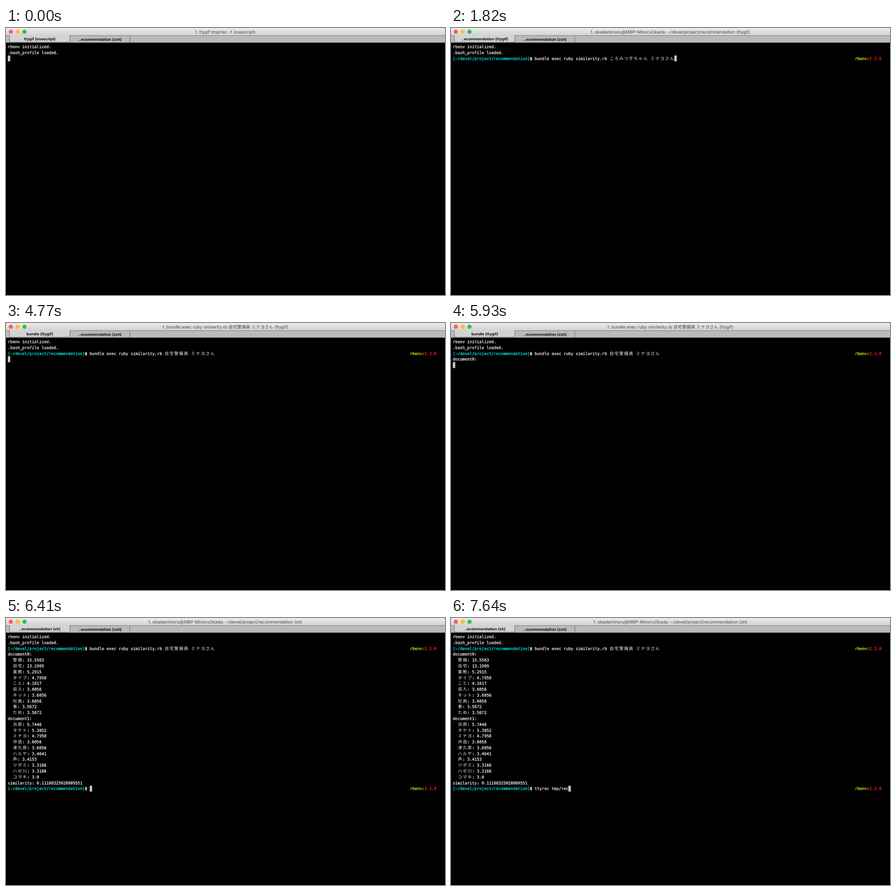
An HTML page with a canvas that plays this animation: 959x584 px, repeating every 7.99 s.

```html
<!DOCTYPE html>
<html lang="ja">
<head>
<meta charset="utf-8">
<title>Terminal</title>
<style>
html, body { margin: 0; width: 100%; height: 100%; overflow: hidden; background: #000; }
canvas { display: block; }
</style>
</head>
<body>
<canvas id="stage" width="959" height="584"></canvas>
<script>
const ctx = document.getElementById('stage').getContext('2d');
const LOOP = 7990, CELL = 5.26, ROW = 12.78, LEFT = 4, TOP = 34.6;
const SANS = 'Inter, "Noto Sans CJK JP", sans-serif';
const MONO = '8.8px "DejaVu Sans Mono", "Noto Sans CJK JP", monospace';
const WIDE = '9.2px "Noto Sans CJK JP", sans-serif';
const FG = '#f0f0f0', CYAN = '#00eeee', YELLOW = '#f0f000', RED = '#ff2020';

const PATH = '~/devel/project/recommendation';
const RUN = 'bundle exec ruby similarity.rb ';
const FINAL = RUN + '自宅警備員 ミナヨさん';
const OUTPUT = `document0:
  警備: 15.5563
  自宅: 13.1909
  業務: 5.2915
  タイプ: 4.7958
  こと: 4.1617
  収入: 3.6056
  ネット: 3.6056
  社員: 3.6056
  事: 3.5672
  ため: 3.5672
document1:
  浜原: 5.7446
  タケト: 5.3852
  ミナヨ: 4.7958
  沖造: 3.6056
  津久原: 3.6056
  ハルヤ: 3.4641
  声: 3.4153
  ツボミ: 3.3166
  ハゼ川: 3.3166
  コマキ: 3.0
similarity: 0.11168325028089551`.split('\n');

const shell = (proc, tab = proc + ')') => ({
  title: `1. okadaminoru@MBP-MinoruOkada: ${PATH} (${proc})`,
  tab: `..ecommendation (${tab}`
});
const capture = shell('screencapture', 'screenca...');

// Each step changes only the named parts of the state.
// cmd: text at the first prompt, lines: printed output (-1 while typing), next: text at the last prompt.
const steps = [
  [0, { title: '1. ttygif tmp/rec -f (osascript)', tab: 'ttygif (osascript)', cmd: null, lines: -1, next: null }],
  [100, capture],
  [170, { cmd: '' }],
  [1150, { cmd: 'ttyrec tmp/rec' }],
  [1470, { ...shell('sh'), cmd: 'ttygif tmp/rec -f' }],
  [1820, { ...shell('ttygif'), cmd: RUN + 'ころみつ子ちゃん ミナヨさん' }],
  [3540, { cmd: RUN + '自宅警備員 ころみつ子ちゃん ' }],
  [4140, { cmd: FINAL }],
  [4770, { title: `1. ${FINAL} (ttygif)`, tab: 'bundle (ttygif)', lines: 0 }],
  [5930, { lines: 1 }],
  ...[4, 8, 11, 15, 19, 23].map((lines, i) => [5970 + i * 73, { lines }]),
  [6410, { ...shell('sh'), next: '' }],
  [6970, { ...capture, next: FINAL }],
  [7640, { ...shell('sh'), next: 'ttyrec tmp/rec' }]
];

function stateAt(t) {
  return Object.assign({}, ...steps.filter(s => s[0] <= t).map(s => s[1]));
}

function rect(x, y, w, h, color) {
  ctx.fillStyle = color;
  ctx.fillRect(x, y, w, h);
}

function label(text, x, y, font, color) {
  ctx.font = font;
  ctx.fillStyle = color;
  ctx.textAlign = 'center';
  ctx.fillText(text, x, y);
}

// Prints on the character grid and returns the column after the text.
function print(text, col, row, color = FG, weight = '') {
  ctx.textAlign = 'left';
  ctx.fillStyle = ctx.strokeStyle = color;
  ctx.lineWidth = 0.3;
  const y = TOP + row * ROW + 9.5;
  for (const c of text) {
    const wide = c > '\u2fff', x = LEFT + col * CELL + (wide ? 0.6 : 0);
    ctx.font = weight + (wide ? WIDE : MONO);
    ctx.fillText(c, x, y);
    if (!wide) ctx.strokeText(c, x, y);
    col += wide ? 2 : 1;
  }
  return col;
}

function prompt(cmd, row) {
  print('rbenv:', 167, row, YELLOW);
  print('2.3.0', 173, row, RED);
  print(`[${PATH}]`, 0, row, CYAN);
  print('$', 32, row, '#fff', 'bold ');
  return print(cmd, 34, row);
}

function cursor(col, row) {
  rect(LEFT + col * CELL, TOP + row * ROW, CELL, ROW, '#c7c7c7');
}

function drawWindow({ title, tab }) {
  const bar = ctx.createLinearGradient(0, 0, 0, 16);
  bar.addColorStop(0, '#ebebeb');
  bar.addColorStop(1, '#d3d3d3');
  rect(0, 0, 959, 16, bar);
  rect(0, 16, 959, 16, '#bababa');
  rect(0, 16, 959, 1, '#7c7c7c');
  rect(0, 31.5, 959, 1, '#686868');
  rect(270, 17, 1, 15, '#686868');

  ctx.beginPath();
  ctx.moveTo(7.5, 16);
  ctx.lineTo(7.5, 28.5);
  ctx.quadraticCurveTo(7.5, 31, 10, 31);
  ctx.lineTo(137, 31);
  ctx.quadraticCurveTo(139.5, 31, 139.5, 28.5);
  ctx.lineTo(139.5, 16);
  ctx.fillStyle = '#d3d3d3';
  ctx.fill();
  ctx.strokeStyle = '#686868';
  ctx.lineWidth = 1;
  ctx.stroke();

  ['#f95f5b', '#fbbc41', '#34c04a'].forEach((color, i) => {
    ctx.beginPath();
    ctx.arc(10.5 + i * 15, 8.2, 4.6, 0, 7);
    ctx.fillStyle = color;
    ctx.fill();
  });

  label(title, 479, 12, '9.54px ' + SANS, '#484848');
  label(tab, 73.8, 27, 'bold 8.4px ' + SANS, '#111');
  label('..ecommendation (zsh)', 205.3, 27.8, 'bold 8.4px ' + SANS, '#111');
}

function draw(s) {
  rect(0, 0, 959, 584, '#000');
  drawWindow(s);
  print('rbenv initialized.', 0, 0);
  print('.bash_profile loaded.', 0, 1);

  let col = 0, row = 2;
  if (s.cmd !== null) col = prompt(s.cmd, row);
  if (s.lines >= 0) {
    OUTPUT.slice(0, s.lines).forEach((line, i) => print(line, 0, 3 + i));
    row = 3 + s.lines;
    col = s.next === null ? 0 : prompt(s.next, row);
  }
  cursor(col, row);
}

ctx.textRendering = 'geometricPrecision';
ctx.lineJoin = 'round';
const start = performance.now();
function tick() {
  draw(stateAt((performance.now() - start) % LOOP));
  requestAnimationFrame(tick);
}
tick();
</script>
</body>
</html>
```
